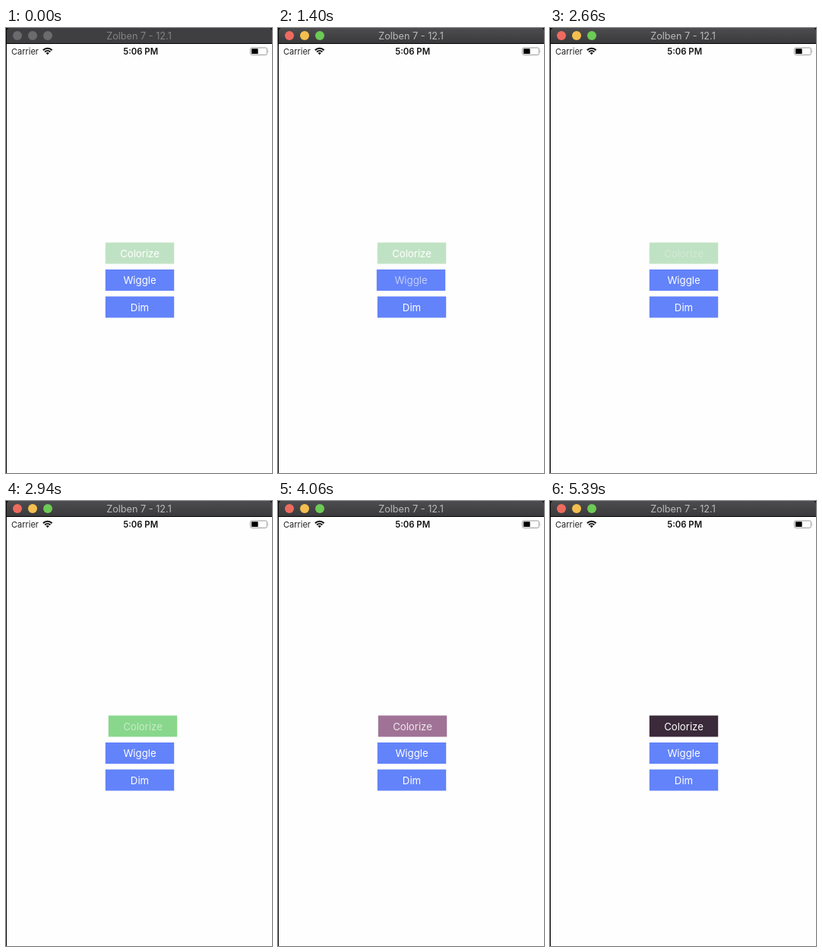
Write an HTML page that moves like this. It is 350 px wide and 586 px high and loops after 5.46 s.

```html
<!DOCTYPE html>
<html lang="en">
<head>
<meta charset="utf-8">
<title>Button effects</title>
<style>
  html, body { margin: 0; width: 100%; height: 100%; overflow: hidden; background: #fff; }
  svg { display: block; width: 350px; height: 586px; font-family: Inter, Roboto, sans-serif; }
  text { text-anchor: middle; }
  .label { font-size: 13.2px; fill: #fff; }
</style>
</head>
<body>
<svg viewBox="0 0 350 586">
  <defs>
    <linearGradient id="bar" x2="0" y2="1">
      <stop offset="0" stop-color="#4d4d4f"/>
      <stop offset="1" stop-color="#3a3a3c"/>
    </linearGradient>
  </defs>
  <rect width="350" height="586" fill="#050505"/>
  <rect x="1" y="21" width="349" height="565" fill="#fefefe"/>
  <path id="top" d="M1 20V4Q1 0 5 0H346Q350 0 350 4V20Z"/>
  <g id="lights">
    <circle cx="15" cy="10" r="6"/>
    <circle cx="35" cy="10" r="6"/>
    <circle cx="55" cy="10" r="6"/>
  </g>
  <text id="title" x="175" y="14.8" font-size="12.7">Zolben 7 - 12.1</text>

  <text x="7" y="34.5" font-size="11" fill="#222" style="text-anchor:start">Carrier</text>
  <g id="wifi" fill="none" stroke="#111" stroke-width="2"></g>
  <text x="177.2" y="34.5" font-size="11.3" font-weight="600" fill="#111">5:06 PM</text>
  <rect x="321.5" y="26" width="22" height="9.4" rx="2" fill="none" stroke="#999" stroke-width="1"/>
  <rect x="323" y="27.3" width="8.6" height="6.8" rx=".7" fill="#000"/>
  <path d="M344.8 29.2Q346.4 30.7 344.8 32.2Z" fill="#999"/>
  <g id="buttons"></g>
</svg>
<script>
const LOOP = 5460, STEP = 70, ACTIVE_AT = 1120;
const BLUE = [99, 131, 250];
const PALETTE = [[192, 226, 196], [0, 175, 8], [160, 115, 150], [58, 42, 58]];

const $ = id => document.getElementById(id);
const clamp = v => Math.min(1, Math.max(0, v));
const smooth = p => p * p * (3 - 2 * p);
const mix = (a, b, p) => a.map((v, i) => v + (b[i] - v) * p);
const rgb = c => `rgb(${c.map(Math.round)})`;

function add(parent, tag, attrs, text = '') {
  const el = document.createElementNS('http://www.w3.org/2000/svg', tag);
  for (const k in attrs) el.setAttribute(k, attrs[k]);
  el.textContent = text;
  parent.append(el);
  return el;
}

// down: finger down, up: label starts to recover, start: effects begin
const BUTTONS = [
  { label: 'Colorize', y: 282.5, taps: [
    { down: 2660, up: 2800, fade: 470, start: 2800, shake: 4, dim: true, color: 1 },
    { down: 3500, up: 3710, fade: 470, start: 3710, shake: -1, dim: true, color: 2 },
    { down: 4410, up: 4550, fade: 470, start: 4550, shake: 4, decay: .75, dim: true, color: 3 }
  ] },
  { label: 'Wiggle', y: 318, taps: [{ down: 1120, up: 1220, fade: 470, start: 1260, shake: -1 }] },
  { label: 'Dim', y: 353.5, taps: [{ down: 1960, up: 2010, fade: 300, start: 1960, dim: true }] }
];

for (const b of BUTTONS) {
  b.group = add($('buttons'), 'g', {});
  b.box = add(b.group, 'rect', { x: 130.8, y: b.y, width: 90.4, height: 28 });
  b.text = add(b.group, 'text', { x: 176, y: b.y + 19, class: 'label' }, b.label);
}

function arc(r) {
  const x = r * .7, y = r * .714;
  return `M${54.7 - x} ${35.2 - y}A${r} ${r} 0 0 1 ${54.7 + x} ${35.2 - y}`;
}
for (const r of [5.2, 8.4]) add($('wifi'), 'path', { d: arc(r) });
add($('wifi'), 'path', { d: arc(3) + 'L54.7 35.2Z', fill: '#111', stroke: 'none' });

function shakeAt(tap, dt) {
  const k = Math.floor(dt / STEP);
  if (!tap.shake || k < 0 || k > 7) return 0;
  const size = tap.shake - Math.max(0, k - 3) * (tap.decay || 0);
  return k % 2 ? -size : size;
}

function drawButton(b, t) {
  let x = 0, alpha = 1, ink = 1;
  let color = b.label === 'Colorize' ? PALETTE[0] : BLUE;
  for (const tap of b.taps) {
    const dt = t - tap.start;
    x += shakeAt(tap, dt);
    if (tap.dim) alpha -= .32 * Math.sin(Math.PI * clamp(dt / 350));
    if (tap.color) color = mix(color, PALETTE[tap.color], smooth(clamp(dt / 260)));
    if (t >= tap.down) ink = .25 + .75 * clamp((t - tap.up) / tap.fade) ** .8;
  }
  b.group.setAttribute('transform', `translate(${x} 0)`);
  b.group.setAttribute('opacity', alpha);
  b.box.setAttribute('fill', rgb(color));
  b.text.setAttribute('opacity', ink);
}

function draw(time) {
  const t = Math.floor(time % LOOP / STEP) * STEP;
  const active = t >= ACTIVE_AT;
  $('top').setAttribute('fill', active ? 'url(#bar)' : '#3f3f41');
  $('title').setAttribute('fill', active ? '#b9b9ba' : '#828284');
  ['#ee6a5f', '#f5bf4f', '#6cca55'].forEach((c, i) =>
    $('lights').children[i].setAttribute('fill', active ? c : '#6b6b6d'));
  BUTTONS.forEach(b => drawButton(b, t));
}

const origin = performance.now();
function tick() {
  draw(performance.now() - origin);
  requestAnimationFrame(tick);
}
tick();
</script>
</body>
</html>
```
